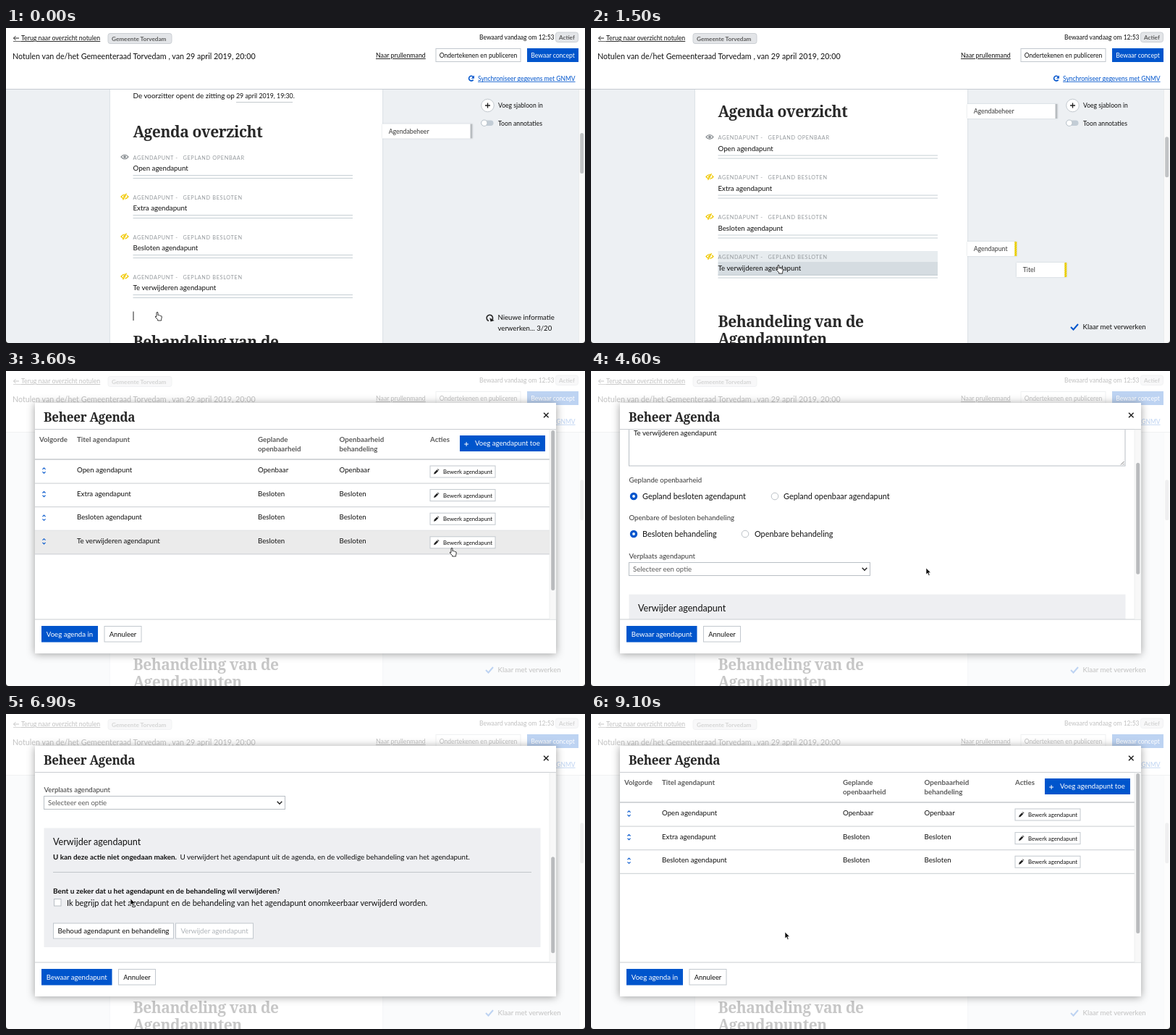
An HTML page for the animation above (9.2 s loop, 800 by 435 pixels).

```html
<!DOCTYPE html>
<html lang="nl">
<head>
<meta charset="utf-8">
<title>Agenda beheren</title>
<style>
html, body { margin: 0; width: 100%; height: 100%; overflow: hidden; background: #fff; }
svg { display: block; width: 800px; height: 435px; }
text { font-family: Lato, "Open Sans", sans-serif; fill: #111; white-space: pre; }
.b { font-weight: 700; }
.h { font-family: "Noto Serif", "Liberation Serif", serif; font-weight: 700; fill: #282828; letter-spacing: -.3px; }
.big { letter-spacing: -.42px; }
.w { fill: #fff; }
.g { fill: #5c5c5c; }
.m { fill: #3a3a3a; }
.cap { fill: #959a9e; letter-spacing: .65px; }
.blue { fill: #0055cc; }
.red { fill: #d01818; }
.off { fill: #aeb3b8; }
.u { text-decoration: underline; }
.ln { fill: none; stroke: #222; stroke-width: 1.4; }
</style>
</head>
<body>
<svg id="stage" viewBox="0 0 800 435" xmlns="http://www.w3.org/2000/svg"></svg>
<script>
const LOOP = 9200, STEP = 100;

// ---- drawing helpers
const text = (x, y, s, size = 9.7, cls = '', id = '') =>
  `<text x="${x}" y="${y}" font-size="${size}" class="${cls}"${id && ` id="${id}"`}>${s}</text>`;
const rect = (x, y, w, h, fill, stroke = 'none', more = '') =>
  `<rect x="${x}" y="${y}" width="${w}" height="${h}" fill="${fill}" stroke="${stroke}" ${more}/>`;
const path = (d, more = 'class="ln"') => `<path d="${d}" ${more}/>`;
const group = (id, body) => `<g id="${id}">${body}</g>`;
const at = (x, y, body, turn = 0) => `<g transform="translate(${x} ${y}) rotate(${turn})">${body}</g>`;
const button = (x, y, w, h, label, size, kind = '') => {
  const solid = kind === 'w';
  return rect(x + .5, y + .5, w - 1, h - 1, solid ? '#0055cc' : '#fff', solid ? '#0055cc' : '#c2c8ce') +
    `<text x="${x + w / 2}" y="${y + h / 2 + size * .36}" font-size="${size}" text-anchor="middle" class="${kind}">${label}</text>`;
};

// ---- icons
const eye = (color, slash) =>
  path('M-5 0Q0 -6 5 0Q0 6 -5 0Z', `fill="none" stroke="${color}" stroke-width="1.2"`) +
  `<circle r="1.9" fill="${color}"/>` +
  (slash ? path('M-1.6 4L3.2 -4', 'stroke="#fff" stroke-width="1.6"') +
           path('M-2.5 4.4L2.5 -4.4', `stroke="${color}" stroke-width="1.3"`) : '');
const reload = (color, r) =>
  path(`M${r * .75} ${-r * .6}A${r} ${r} 0 1 0 ${r * .8} ${r * .6}`, `fill="none" stroke="${color}" stroke-width="1.6"`) +
  path(`M${r * 1.2} ${-r * 1.2}V${r * .05}H${-r * .05}Z`, `fill="${color}"`);
const pencil = path('M-3.5 3.5L-2.7 .9L1 -2.8L2.8 -1L-.9 2.7Z M1.6 -3.4L2.2 -4L4 -2.2L3.4 -1.6Z', 'fill="#222"');
const sorter = path('M-2 -1.6L0 -3.6L2 -1.6M-2 1.6L0 3.6L2 1.6', 'fill="none" stroke="#0055cc" stroke-width="1.1"');
const chevron = path('M-3.3 -1.7L0 1.7L3.3 -1.7');
const radio = (x, y, on) => on
  ? `<circle cx="${x}" cy="${y}" r="5.2" fill="#0055cc"/><circle cx="${x}" cy="${y}" r="1.9" fill="#fff"/>`
  : `<circle cx="${x}" cy="${y}" r="4.8" fill="#fff" stroke="#bcc2c8"/>`;

// ---- page
const items = ['Open agendapunt', 'Extra agendapunt', 'Besloten agendapunt', 'Te verwijderen agendapunt'];

const docItem = (title, i) => at(0, 55 * i,
  at(164, 178, eye(i ? '#f0c800' : '#8b9094', i)) +
  text(175.5, 181.5, 'AGENDAPUNT -', 7.3, 'cap') +
  text(244.5, 181.5, i ? 'GEPLAND BESLOTEN' : 'GEPLAND OPENBAAR', 7.3, 'cap') +
  text(175.5, 197, title) +
  path('M175.5 203.5H479M175.5 207.5H479', 'stroke="#c6cfd4"'));

const hint = (x, y, w, label, bar) =>
  rect(x, y, w, 20, '#fff', 'none', 'filter="url(#soft)"') +
  rect(x + w - 3, y, 3, 20, bar) + text(x + 8.7, y + 13.2, label, 8.75, 'm');

const doc =
  rect(144, 40, 376, 460, '#fff', 'none', 'filter="url(#soft)"') +
  group('scroller',
    text(175.5, 97, 'De voorzitter opent de zitting op', 9.85) +
    text(318, 97, '29 april 2019, 19:30.', 8.8) +
    path('M318 102.5H396', 'stroke="#c5cace"') +
    text(175.5, 150.5, 'Agenda overzicht', 21, 'h big') +
    group('active',
      rect(175.5, 335.5, 303.5, 15, '#e7ecef') + rect(175.5, 350.5, 303.5, 19, '#d5dce1')) +
    items.map(docItem).join('') +
    group('caret', path('M176 391.5V404', 'stroke="#222"')) +
    text(175.5, 440.5, 'Behandeling van de', 21, 'h big') +
    text(175.5, 464.5, 'Agendapunten', 21, 'h big') +
    hint(520, 132.5, 124.5, 'Agendabeheer', '#b7bcc0') +
    group('hints',
      hint(520, 322.5, 68.3, 'Agendapunt', 'url(#stripe)') +
      hint(588, 351.5, 69.3, 'Titel', 'url(#stripe)')));

const side =
  '<circle cx="665.5" cy="107" r="8.8" fill="#fff" stroke="#c2c8ce"/>' +
  path('M662 107H669M665.5 103.5V110.5') +
  text(680, 110.3, 'Voeg sjabloon in', 8.6) +
  rect(656.5, 127.5, 17, 7.5, '#c3cdd6', 'none', 'rx="3.75"') +
  '<circle cx="660.8" cy="131.2" r="4.2" fill="#fff" stroke="#b6c0c8"/>' +
  text(680, 134.5, 'Toon annotaties', 8.7) +
  group('busy',
    at(668.5, 400.5, reload('#222', 4.2), 75) +
    text(679.5, 403.2, 'Nieuwe informatie', 9.6) + text(679.5, 418.2, '', 9.6, '', 'count')) +
  group('ready',
    path('M663 413L666.5 416.5L673 409', 'fill="none" stroke="#0055cc" stroke-width="2"') +
    text(679.5, 416.3, 'Klaar met verwerken', 9.65)) +
  rect(791.5, 85, 8.5, 350, '#fafafa', '#e4e6e8', 'stroke-width=".6"') +
  rect(793.2, 145, 5, 56, '#c1c3c5', 'none', 'rx="2.5" id="thumb"');

const head =
  rect(0, 0, 800, 84, '#fff') + path('M0 84.5H800', 'stroke="#c6ccd2"') +
  path('M10.5 14H18M13.5 11L10.5 14L13.5 17', 'fill="none" stroke="#222"') +
  path('M10 18.5H21', 'stroke="#222" stroke-width=".7"') +
  text(21, 17, 'Terug naar overzicht notulen', 8.75, 'u') +
  rect(141, 7.5, 88, 14, '#e3e5e8', '#cbcfd4', 'rx="3"') +
  text(146, 17.6, 'Gemeente Torvedam', 8.2, 'b g') +
  text(654, 16.3, 'Bewaard vandaag om 12:53', 8.5) +
  rect(759.5, 6, 31, 13.5, '#e3e5e8', '#cbcfd4', 'rx="3"') +
  text(764, 15.8, 'Actief', 8.1, 'b g') +
  text(9, 43.3, 'Notulen van de/het Gemeenteraad Torvedam , van 29 april 2019, 20:00', 10.73) +
  text(511, 41, 'Naar prullenmand', 8.8, 'u') +
  button(593.5, 28, 118, 19, 'Ondertekenen en publiceren', 8.6) +
  button(720, 28, 71, 19, 'Bewaar concept', 8.65, 'w') +
  at(643, 69.5, reload('#0055cc', 3.3)) +
  text(652, 72.8, 'Synchroniseer gegevens met GNMV', 8.5, 'blue u');

// ---- dialog: agenda list
const ROW = 32.6, TOP = 122.5;
const listRow = (title, i) => {
  const open = i ? 'Besloten' : 'Openbaar', y = TOP + ROW * i;
  return group('row' + i,
    rect(40, y, 711, ROW, '#ebebeb', 'none', `id="hover${i}"`) +
    at(52.5, y + 15, sorter) +
    text(98, y + 17.6, title) + text(348, y + 17.6, open) + text(460.5, y + 17.6, open) +
    rect(586, y + 8.5, 90, 16, '#fff', '#c2c8ce') + at(594.5, y + 16.5, pencil) +
    text(604, y + 19.6, 'Bewerk agendapunt', 7.75) +
    path(`M40 ${y + ROW}H751`, 'stroke="#c9cdd1"'));
};
const columns = [[46, 'Volgorde'], [98, 'Titel agendapunt'], [348, 'Geplande', 'openbaarheid'],
  [460.5, 'Openbaarheid', 'behandeling'], [586, 'Acties']];
const list =
  columns.map(([x, a, b = '']) => text(x, 98, a, 9.75, 'b g') + text(x, 110.5, b, 9.75, 'b g')).join('') +
  rect(627, 89, 118, 22, '#0055cc') +
  path('M633.2 101H639M636.1 98.1V103.9', 'stroke="#fff"') + text(648, 103.4, 'Voeg agendapunt toe', 9.6, 'w') +
  path('M40 122H751', 'stroke="#c4c8cc" stroke-width="1.6"') +
  items.map(listRow).join('');

// ---- dialog: edit form, laid out unscrolled
const del = 'Verwijder agendapunt';
const form =
  text(52.5, 144, 'Titel agendapunt') +
  rect(52.5, 150.5, 685.5, 56.5, '#fff', '#b9bfc5') + text(59, 165, items[3]) +
  path('M732 205.5L736.5 201M735 205.5L736.5 204', 'stroke="#777"') +
  text(52.5, 230, 'Geplande openbaarheid', 9.65, 'm') +
  radio(59, 249, 1) + text(71, 252.8, 'Gepland besloten agendapunt', 10.9) +
  radio(254, 249) + text(266, 252.8, 'Gepland openbaar agendapunt', 10.9) +
  text(52.5, 282, 'Openbare of besloten behandeling', 9.65, 'm') +
  radio(59, 301, 1) + text(71, 304.8, 'Besloten behandeling', 10.9) +
  radio(213, 301) + text(226, 304.8, 'Openbare behandeling', 10.9) +
  text(52.5, 335.2, 'Verplaats agendapunt', 9.65, 'm') +
  rect(52.5, 340.5, 333, 18, '#fff', '#b9bfc5') +
  text(58, 352.8, 'Selecteer een optie', 9.6, 'g') + at(378, 349.5, chevron) +
  rect(52.5, 384.5, 686, 95, '#eeeff2', 'none', 'id="panel"') +
  text(65, 408.3, del, 12.6) +
  text(65, 428, 'U kan deze actie niet ongedaan maken.', 9.9, 'b') +
  text(240.5, 428, 'U verwijdert het agendapunt uit de agenda, en de volledige behandeling van het agendapunt.', 9.88) +
  group('ask', button(65, 445, 293, 22, 'Verwijder het agendapunt en de behandeling van het agendapunt', 9.85, 'red')) +
  group('confirm',
    path('M65 445.5H726', 'stroke="#c2c6ca"') +
    text(65, 475.3, 'Bent u zeker dat u het agendapunt en de behandeling wil verwijderen?', 10.1, 'b') +
    rect(66.5, 482.5, 9.5, 9.5, '#fff', '#b9bfc5') +
    group('tick', rect(66, 482, 10.5, 10.5, '#0055cc') +
      path('M68.4 487.3L70.5 489.5L74.2 485', 'fill="none" stroke="#fff" stroke-width="1.4"')) +
    text(84, 491.5, 'Ik begrijp dat het agendapunt en de behandeling van het agendapunt onomkeerbaar verwijderd worden.', 11) +
    button(65, 515.5, 167, 22, 'Behoud agendapunt en behandeling', 9.75) +
    group('delOff', button(234, 515.5, 108, 22, del, 9.7, 'off')) +
    group('delOn', button(234, 515.5, 108, 22, del, 9.7, 'red')));

const dialog =
  rect(0, 0, 800, 435, '#fff', 'none', 'opacity=".74"') +
  rect(40, 44, 720, 346, '#fff', 'none', 'filter="url(#deep)"') +
  `<g clip-path="url(#view)">${group('list', list)}${group('edit', group('form', form))}</g>` +
  path('M40 80.5H760M40 343H760', 'stroke="#c9cdd1"') +
  text(52, 69.5, 'Beheer Agenda', 17.1, 'h') +
  path('M743 57.7L749.6 64.3M749.6 57.7L743 64.3', 'stroke="#222" stroke-width="1.5"') +
  rect(751, 81, 9, 262, '#f8f8f8', '#e4e6e8', 'stroke-width=".6"') +
  rect(753.2, 82, 5, 221, '#b9bbbd', 'none', 'rx="2.5" id="bar"') +
  group('footList', button(49, 352, 78, 22.5, 'Voeg agenda in', 9.65, 'w') + button(135.5, 352, 52, 22.5, 'Annuleer', 9.4)) +
  group('footEdit', button(49, 352, 97.5, 22.5, 'Bewaar agendapunt', 9.65, 'w') + button(155, 352, 52, 22.5, 'Annuleer', 9.4));

const pointer =
  group('hand', path('M0 1Q1 -.6 2 1V4.6Q3.2 3.8 3.7 5Q4.9 4.4 5.4 5.6Q7.3 5.2 7.3 7L6.6 10.5V12H1.6V10.7L-1.8 7Q-1.7 5.4 0 6.6Z',
    'fill="#fff" stroke="#222" stroke-width=".9" stroke-linejoin="round"')) +
  group('arrow', path('M0 0V9L2.1 7.1L3.6 10.4L5.1 9.7L3.7 6.5H6.5Z', 'fill="#111" stroke="#fff" stroke-width=".6"'));

document.getElementById('stage').innerHTML = `<defs>
  <filter id="soft" x="-10%" y="-20%" width="120%" height="140%"><feDropShadow dx="0" dy="0" stdDeviation="1.3" flood-color="#8795a3" flood-opacity=".4"/></filter>
  <filter id="deep"><feDropShadow dx="0" dy="1" stdDeviation="6" flood-color="#000" flood-opacity=".38"/></filter>
  <pattern id="stripe" width="3" height="3" patternUnits="userSpaceOnUse"><rect width="3" height="3" fill="#ffe615"/><path d="M0 3L3 0" stroke="#b89a00" stroke-width=".9"/></pattern>
  <clipPath id="view"><rect x="40" y="81" width="711" height="262"/></clipPath></defs>` +
  rect(0, 0, 800, 435, '#edf0f3') + doc + side + head + group('dialog', dialog) + group('cursor', pointer) +
  path('M0 431Q0 435 4 435H0ZM800 431Q800 435 796 435H800Z', 'fill="#222"');

// ---- motion: rows of [ms, ...values]
const moves = {
  cursor: [[0, 208, 392], [200, 208, 392], [1000, 258, 327], [1600, 258, 327], [2250, 580, 113], [2600, 580, 113],
    [3300, 613, 236], [3600, 615, 244], [4100, 615, 244], [4500, 463, 272], [4700, 463, 272], [5500, 317, 299],
    [5600, 317, 299], [5900, 300, 308], [6200, 300, 308], [6900, 172, 255], [7200, 70, 258], [7400, 70, 258],
    [7800, 268, 301], [9200, 268, 301]],
  page: [[0, 0], [200, 0], [800, 27.5]],
  form: [[0, 0], [4200, 0], [4600, 76], [4700, 76], [5300, 144], [6200, 144], [6700, 227]],
  fade: [[0, 0], [2500, 0], [2700, 1]]
};
const arrowTimes = [[2700, 3200], [4100, 5800], [6200, 7700], [8100, LOOP]];

const ease = k => k * k * (3 - 2 * k);
function value(keys, t) {
  const i = keys.findIndex(k => k[0] > t);
  if (i < 0) return keys[keys.length - 1].slice(1);
  const a = keys[i - 1], b = keys[i], k = ease((t - a[0]) / (b[0] - a[0]));
  return a.slice(1).map((v, n) => v + (b[n + 1] - v) * k);
}

const cache = {};
const el = id => cache[id] || (cache[id] = document.getElementById(id));
const show = (id, on) => { el(id).style.display = on ? '' : 'none'; };
const set = (id, name, v) => el(id).setAttribute(name, v);
const shift = (id, x, y) => set(id, 'transform', `translate(${x} ${y})`);

function draw(t) {
  const [x, y] = value(moves.cursor, t), [page] = value(moves.page, t);
  const [scroll] = value(moves.form, t), [fade] = value(moves.fade, t);
  const editing = t >= 4100 && t < 8100, asked = t >= 6100, ticked = t >= 7200, gone = t >= 8100;
  const arrow = arrowTimes.some(([a, b]) => t >= a && t < b);

  shift('cursor', x, y);
  show('arrow', arrow);
  show('hand', !arrow);

  shift('scroller', 0, -page);
  set('thumb', 'y', 145 + page * .19);
  show('caret', t < 600);
  show('active', t >= 1300);
  show('hints', t >= 1300);
  show('busy', t < 900);
  show('ready', t >= 900);
  el('count').textContent = `verwerken... ${Math.min(20, 3 + Math.floor(t / 50))}/20`;

  show('dialog', fade > 0);
  el('dialog').style.opacity = fade;
  show('list', !editing);
  show('footList', !editing);
  show('edit', editing);
  show('footEdit', editing);
  items.forEach((_, i) => show('hover' + i, fade === 1 && Math.floor((y - TOP) / ROW) === i));
  show('row3', !gone);

  shift('form', 0, -scroll);
  set('panel', 'height', asked ? 164.5 : 95);
  show('ask', !asked);
  show('confirm', asked);
  show('tick', ticked);
  show('delOn', ticked);
  show('delOff', !ticked);
  const full = asked ? 514 : 444;
  set('bar', 'y', editing ? 82 + scroll / full * 261 : 82);
  set('bar', 'height', editing ? 262 * 261 / full : 221);
}

const start = performance.now();
function tick(now) {
  const t = Math.max(0, now - start) % LOOP;
  draw(Math.floor(t / STEP) * STEP);
  requestAnimationFrame(tick);
}
draw(0);
requestAnimationFrame(tick);
</script>
</body>
</html>
```
